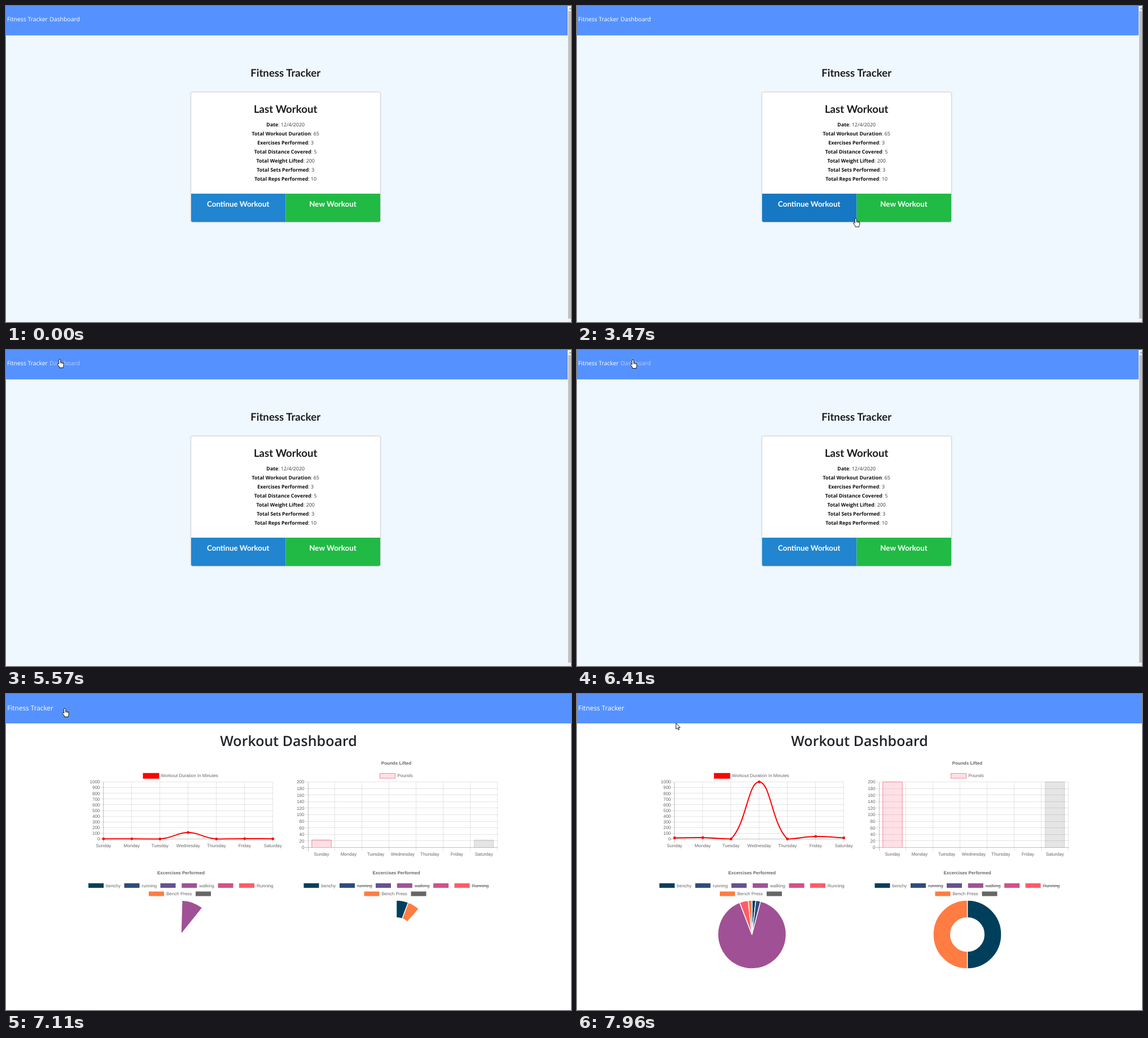
An HTML page for the animation above (8000 ms loop, 1001 by 559 pixels).

```html
<!DOCTYPE html>
<html lang="en">
<head>
<meta charset="utf-8">
<title>Fitness Tracker</title>
<style>
  html, body { margin: 0; width: 100%; height: 100%; overflow: hidden; background: #fff; }
  svg { display: block; width: 1001px; height: 559px; text-rendering: geometricPrecision; }
  .ui { font-family: "Open Sans", "Noto Sans", sans-serif; }
  .nav { font-size: 10.4px; fill: #fff; }
  .lato { font-family: Lato, sans-serif; font-weight: 700; text-anchor: middle; }
  .head { font-size: 18.67px; fill: #1b1c1d; }
  .btn { font-size: 13.33px; fill: #fff; }
  .stat { font-size: 8.9px; fill: #383838; text-anchor: middle; }
  .stat tspan { font-weight: 700; fill: #111; }
  .title { font-size: 25px; font-weight: 600; fill: #212529; text-anchor: middle; }
  .card { filter: drop-shadow(0 .7px 1px #c4c5c8); }
  #charts text { font: 8px "Liberation Sans", Arial, sans-serif; fill: #666; }
  #charts text.bold { font-weight: 700; }
  .mid { text-anchor: middle; }
  .end { text-anchor: end; }
  .off { text-decoration: line-through; }
  .grid { stroke: rgba(0, 0, 0, .1); shape-rendering: crispEdges; }
  .zero { stroke: rgba(0, 0, 0, .25); shape-rendering: crispEdges; }
  .slice { stroke: #fff; stroke-width: 1.4; stroke-linejoin: bevel; }
  .cursor path { fill: #fff; stroke: #000; stroke-width: .9; stroke-linejoin: round; }
  .cursor .crease { fill: none; stroke-width: .7; }
</style>
</head>
<body>
<svg viewBox="0 0 1001 559">
  <g id="home">
    <rect width="1001" height="559" fill="#f0f8ff"/>
    <rect width="995" height="52" fill="#5692ff"/>
    <text class="ui nav" x="2" y="26.8">Fitness Tracker</text>
    <text class="ui nav" id="link" x="77.3" y="26.8">Dashboard</text>
    <rect x="995" width="6" height="559" fill="#f1f1f1"/>
    <rect x="996" y="9" width="5" height="544" fill="#c1c1c1"/>
    <path d="M997 6L999.5 3L1001 5V6Z" fill="#a3a3a3"/>
    <text class="lato head" x="495.2" y="124.8">Fitness Tracker</text>
    <g class="card">
      <rect x="327.8" y="152.5" width="335.4" height="229.7" rx="2.7" fill="#fff" stroke="#d4d4d5" stroke-width=".7"/>
      <path id="blue" d="M328 332H495.5V382H330.7Q328 382 328 379.3Z"/>
      <path id="green" d="M495.5 332H663V379.3Q663 382 660.3 382H495.5Z"/>
    </g>
    <text class="lato head" x="495.2" y="188.5">Last Workout</text>
    <g id="stats"></g>
    <text class="lato btn" x="411.3" y="354.6">Continue Workout</text>
    <text class="lato btn" x="579" y="354.6">New Workout</text>
  </g>
  <g id="dash">
    <rect width="1001" height="559" fill="#fff"/>
    <rect width="1001" height="52" fill="#5692ff"/>
    <text class="ui nav" x="2.3" y="29.2" style="font-size:11.8px">Fitness Tracker</text>
    <text class="ui title" x="500.5" y="92">Workout Dashboard</text>
    <g id="charts"></g>
  </g>
  <g class="cursor" id="arrow">
    <path d="M.5 .5V11.2L3 8.9L4.7 12.6L6.3 11.9L4.7 8.4H8Z"/>
  </g>
  <g class="cursor" id="hand">
    <path d="M-1.5 1.6Q-1.5 .4 0 .4T1.5 1.6V5.6Q3 4.8 3.5 6Q5 5.4 5.3 6.8Q7 6.4 7 8V11Q7 12.5 6 13.5V15.5H-.7V14L-3.8 9.8Q-4.6 8.2 -3.4 7.7Q-2.5 7.4 -1.5 9Z"/>
    <path class="crease" d="M1.5 5.5V8M3.5 6V8.3M5.3 6.8V8.6"/>
  </g>
</svg>
<script>
const LOOP = 8000, DASH_AT = 6810, CHARTS_AT = 7040, ANIM_START = 7010, ARROW_AT = 7720;
const byId = id => document.getElementById(id);

function add(parent, tag, attrs, text) {
  const node = document.createElementNS('http://www.w3.org/2000/svg', tag);
  for (const key in attrs) node.setAttribute(key, attrs[key]);
  if (text !== undefined) node.textContent = text;
  parent.append(node);
  return node;
}

// Summary lines on the card
[['Date', '12/4/2020'], ['Total Workout Duration', 65], ['Exercises Performed', 3],
 ['Total Distance Covered', 5], ['Total Weight Lifted', 200],
 ['Total Sets Performed', 3], ['Total Reps Performed', 10]].forEach(([name, value], i) => {
  const line = add(byId('stats'), 'text', { class: 'ui stat', x: 495.2, y: 212.9 + 16.05 * i });
  add(line, 'tspan', {}, name);
  line.append(': ' + value);
});

// Charts
const charts = byId('charts');
const days = ['Sunday', 'Monday', 'Tuesday', 'Wednesday', 'Thursday', 'Friday', 'Saturday'];
const label = (x, y, text, cls = '') => add(charts, 'text', { x, y, class: cls }, text);
const rule = (x1, y1, x2, y2, strong) =>
  add(charts, 'line', { x1, y1, x2, y2, class: strong ? 'zero' : 'grid' });

function axes({ x, right, bottom, max, gap, cols, labelX }) {
  const top = 155.5;
  for (let i = 0; i <= 10; i++) {
    const y = bottom - (bottom - top) * i / 10;
    rule(x - 6.5, y, right, y, i === 0);
    label(x - 6.5, y + 2.8, max * i / 10, 'end');
  }
  for (let i = 0; i <= cols; i++) rule(x + gap * i, top, x + gap * i, bottom + 6.7, i === 0);
  days.forEach((day, i) => label(labelX + gap * i, bottom + 14.3, day, 'mid'));
}

// Duration line
const BASE = 256.5;
axes({ x: 172.8, right: 473, bottom: BASE, max: 1000, gap: 50, cols: 6, labelX: 172.8 });
add(charts, 'rect', { x: 242.6, y: 139.8, width: 28.8, height: 10, fill: 'red' });
label(274.6, 147.3, 'Workout Duration In Minutes');
const points = [20, 25, 0, 1000, 0, 45, 20].map((v, i) => ({ x: 172.8 + 50 * i, h: v * .101 }));
const clampH = h => Math.max(0, Math.min(101, h));
points.forEach((p, i) => {
  const prev = points[i - 1] || p, next = points[i + 1] || p;
  const before = Math.hypot(p.x - prev.x, p.h - prev.h);
  const after = Math.hypot(next.x - p.x, next.h - p.h);
  const control = k => ({ x: p.x + k * (next.x - prev.x), h: clampH(p.h + k * (next.h - prev.h)) });
  p.into = control(-.4 * before / (before + after));
  p.out = control(.4 * after / (before + after));
});
const curve = add(charts, 'path', { fill: 'none', stroke: 'red', 'stroke-width': 2 });
const dots = points.map(p => add(charts, 'circle', { cx: p.x, r: 2.4, fill: 'red' }));

// Pounds bars
const FLOOR = 271.5;
axes({ x: 535, right: 871, bottom: FLOOR, max: 200, gap: 47.95, cols: 7, labelX: 559 });
label(691.5, 125.2, 'Pounds Lifted', 'mid bold');
const pink = { fill: 'rgba(255,99,132,.2)', stroke: 'rgb(240,110,130)', 'stroke-width': .8 };
add(charts, 'rect', { x: 662.3, y: 140.6, width: 27.4, height: 8.4, ...pink });
label(693.5, 147.3, 'Pounds');
const grey = { fill: 'rgba(0,0,0,.1)', stroke: 'rgba(0,0,0,.16)', 'stroke-width': .8 };
const bars = [[541.8, pink], [829.4, grey]].map(([x, paint]) => ({ x, node: add(charts, 'path', paint) }));

// Pie and doughnut
const colors = ['#003f5c', '#2f4b7c', '#665191', '#a05195', '#d45087', '#ff5d66', '#ff7c43', '#666'];
const legend = [['benchy', 146], ['running', 209.5], ['', 273.5], ['walking', 311.3],
                ['', 375.6], ['Running', 413], ['Bench Press', 253], ['', 336]];

function round(cx, hole, values, hidden) {
  label(cx, 319.4, 'Excercises Performed', 'mid bold');
  legend.forEach(([name, x], i) => {
    const y = i < 6 ? 334.8 : 349.4, left = x + cx - 310;
    add(charts, 'rect', { x: left, y, width: 27, height: 8.1, fill: colors[i] });
    label(left + 31, y + 6.9, name, hidden.includes(i) ? 'off' : '');
  });
  const sum = values.reduce((a, b) => a + b);
  const slices = values.map((v, i) => ({
    part: v / sum, node: add(charts, 'path', { class: 'slice', fill: colors[i] })
  })).filter(s => s.part);
  return { cx, hole, slices };
}
const rounds = [
  round(310, 0, [20, 25, 0, 1000, 0, 45, 20, 0], []),
  round(691.5, 29.8, [1, 0, 0, 0, 0, 0, 1, 0], [1, 3, 5])
];

function slicePath(cx, hole, from, to) {
  const at = (r, turn) => {
    const a = turn * 2 * Math.PI;
    return (cx + r * Math.sin(a)).toFixed(2) + ' ' + (425.4 - r * Math.cos(a)).toFixed(2);
  };
  const R = 60.5, big = to - from > .5 ? 1 : 0;
  const inner = hole ? `L${at(hole, to)}A${hole} ${hole} 0 ${big} 0 ${at(hole, from)}` : `L${at(0, 0)}`;
  return `M${at(R, from)}A${R} ${R} 0 ${big} 1 ${at(R, to)}${inner}Z`;
}

function drawCharts(k) {
  const pos = p => p.x + ' ' + (BASE - p.h * k);
  curve.setAttribute('d', points.map((p, i) =>
    i ? `C${pos(points[i - 1].out)} ${pos(p.into)} ${pos(p)}` : 'M' + pos(p)).join(''));
  dots.forEach((dot, i) => dot.setAttribute('cy', BASE - points[i].h * k));
  bars.forEach(({ x, node }) =>
    node.setAttribute('d', `M${x} ${FLOOR}V${FLOOR - 116 * k}H${x + 34.4}V${FLOOR}`));
  for (const { cx, hole, slices } of rounds) {
    let turn = 0;
    for (const { part, node } of slices) {
      node.setAttribute('d', slicePath(cx, hole, turn, turn + part * k));
      turn += part * k;
    }
  }
}

// Pointer moves: first step, last step, number of steps, end x, end y
const moves = [
  [360, 670, 5, 959, 555], [1280, 1890, 9, 621, 368.6],
  [2120, 2360, 4, 483, 375], [2510, 2510, 1, 479, 376],
  [3470, 3710, 4, 538, 373], [4400, 4400, 1, 534.5, 371.6],
  [4470, 5180, 10, 88, 38], [5260, 5260, 1, 86, 30],
  [5490, 5570, 2, 95.2, 16], [5870, 5870, 1, 84, 16],
  [6100, 6100, 1, 99, 25], [6180, 6180, 1, 104, 17],
  [6410, 6410, 1, 99, 17], [6580, 6580, 1, 104, 17],
  [6810, 6810, 1, 104.2, 25], [7720, 7960, 4, 174.8, 51]
];

function pointer(t) {
  let x = 995, y = 537.5;
  for (const [start, end, steps, toX, toY] of moves) {
    if (t < start) break;
    const gap = (end - start) / (steps - 1) || 1;
    const k = Math.min(steps, Math.floor((t - start) / gap + .001) + 1) / steps;
    x += (toX - x) * k;
    y += (toY - y) * k;
  }
  return { x, y };
}

const inside = (p, left, top, right, bottom) => p.x >= left && p.x < right && p.y >= top && p.y < bottom;
const show = (node, on) => { node.style.display = on ? '' : 'none'; };

function draw(t) {
  const p = pointer(t), shown = t >= 360, dash = t >= DASH_AT;
  const onBlue = inside(p, 328, 332, 495.5, 382);
  const onGreen = inside(p, 495.5, 332, 663, 382);
  const onLink = inside(p, 77, 12, 131, 29);
  const hand = dash ? t < ARROW_AT : onBlue || onGreen || onLink;

  show(byId('home'), !dash);
  show(byId('dash'), dash);
  show(charts, t >= CHARTS_AT);
  byId('blue').style.fill = onBlue ? '#1678c2' : '#2185d0';
  byId('green').style.fill = onGreen ? '#16ab39' : '#21ba45';
  byId('link').style.fill = onLink ? '#b4cfff' : '#fff';

  for (const id of ['arrow', 'hand']) {
    show(byId(id), shown && (id === 'hand') === hand);
    byId(id).setAttribute('transform', `translate(${p.x} ${p.y})`);
  }
  if (t >= CHARTS_AT) {
    const sampled = CHARTS_AT + Math.floor((t - CHARTS_AT) / 75) * 75;
    const left = 1 - Math.min(1, (sampled - ANIM_START) / 1000);
    drawCharts(1 - left ** 4);
  }
}

const begun = performance.now();
function tick() {
  draw((performance.now() - begun) % LOOP);
  requestAnimationFrame(tick);
}
tick();
</script>
</body>
</html>
```
